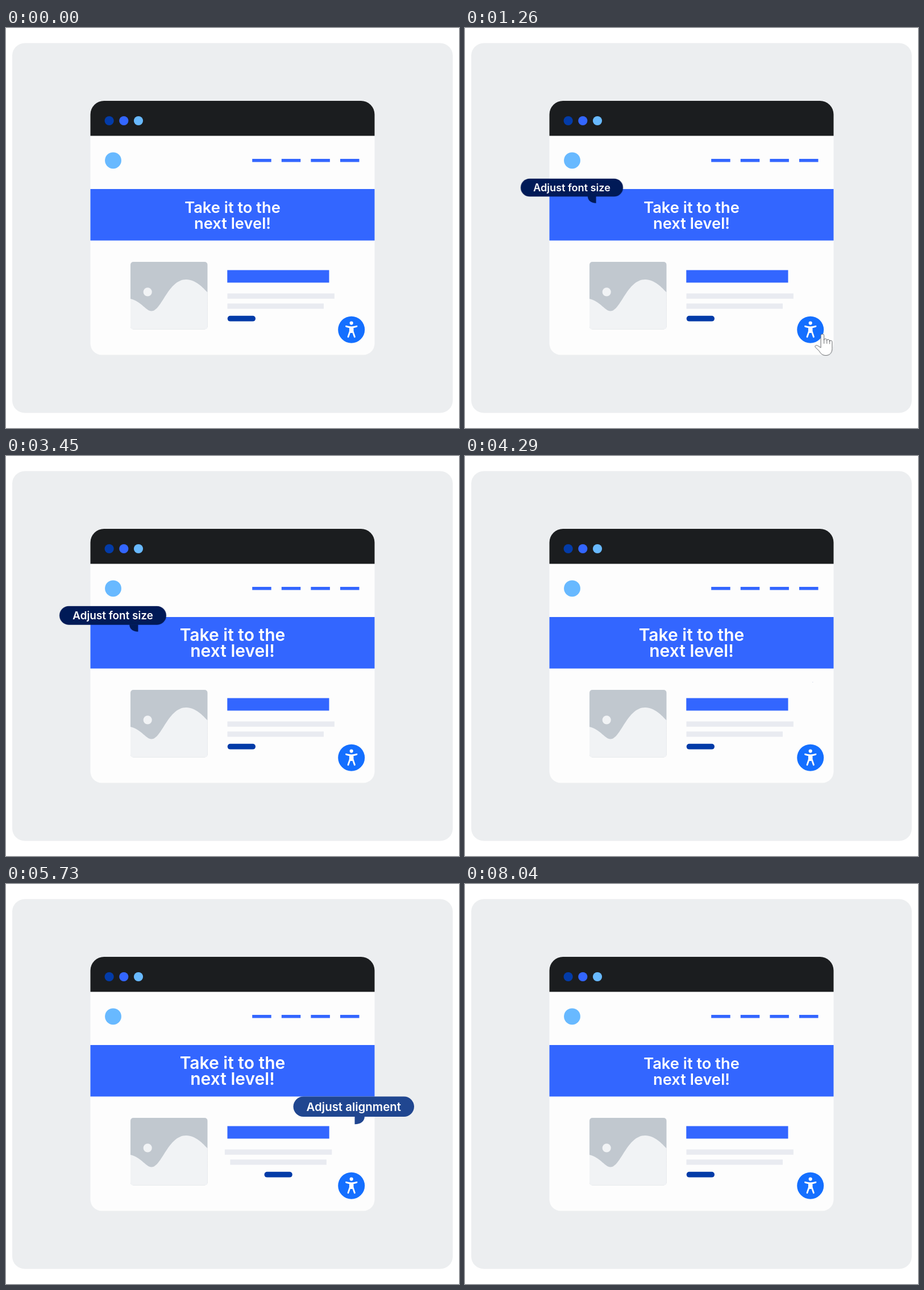
An HTML page with a canvas for the animation above (9 s loop, 797 by 703 pixels).

```html
<!DOCTYPE html>
<html lang="en">
<head>
<meta charset="utf-8">
<title>Accessibility adjustments</title>
<style>
  html, body { margin: 0; width: 100%; height: 100%; overflow: hidden; background: #fff; }
  canvas { display: block; }
</style>
</head>
<body>
<canvas id="stage" width="797" height="703"></canvas>
<script>
const LOOP = 9000, STEP = 30;
const SHUTTER = 16, SAMPLES = 8; // motion blur: ms and sub-frames
const BLUE = '#3366ff', NAVY = '#033ba8', SKY = '#68b9ff', LINE = '#e9ebf1';

const screen = document.getElementById('stage');
const output = screen.getContext('2d');
const layer = document.createElement('canvas');
layer.width = screen.width;
layer.height = screen.height;
const ctx = layer.getContext('2d');

// Timing helpers
const bezier = (a, b, c, d, u) =>
  (1 - u) ** 3 * a + 3 * (1 - u) ** 2 * u * b + 3 * (1 - u) * u * u * c + u ** 3 * d;

const ease = (x1, x2) => p => {
  let low = 0, high = 1;
  for (let i = 0; i < 20; i++) {
    const mid = (low + high) / 2;
    if (bezier(0, x1, x2, 1, mid) < p) low = mid; else high = mid;
  }
  return bezier(0, 0, 1, 1, low);
};
const growEase = ease(.33, .22);
const shrinkEase = ease(.8, .73);
const shiftEase = ease(.4, .3);

const progress = (t, start, end) => Math.min(1, Math.max(0, (t - start) / (end - start)));
const mix = (a, b, p) => a + (b - a) * p;
const toggle = (t, start, end) =>
  shiftEase(progress(t, start, end)) - shiftEase(progress(t, 7770, 8040));

// Drawing helpers
function box(color, left, top, right, bottom, radius = 0) {
  ctx.fillStyle = color;
  ctx.beginPath();
  ctx.roundRect(left, top, right - left, bottom - top, radius);
  ctx.fill();
}
function dot(color, x, y, r) {
  ctx.fillStyle = color;
  ctx.beginPath();
  ctx.arc(x, y, r, 0, 2 * Math.PI);
  ctx.fill();
}
function label(text, x, y, size) {
  ctx.font = `600 ${size}px Inter, "Open Sans", sans-serif`;
  ctx.textAlign = 'center';
  ctx.fillStyle = '#fff';
  ctx.fillText(text, x, y);
}
function fillPath(color, path) {
  ctx.fillStyle = color;
  ctx.fill(path);
}

const hill = new Path2D('M219 476C239 481 246 497.5 256 497.5C274 497.5 285 442 317 442C334 442 347 457 354.5 464.5V524.5Q354.5 529.5 349.5 529.5H224Q219 529.5 219 524.5Z');
const figure = new Path2D('M598.5 524.3Q607.7 527.3 617 524.3M605.3 526V533L602 542.8M610.1 526V533L613.4 542.8M605.5 533.5L607.7 532L609.9 533.5');
const torso = new Path2D('M604.5 525H610.9V533L609.5 536H606L604.5 533Z');
const hand = new Path2D('M10.8 24V3.2a2.8 2.8 0 0 1 5.6 0V11c0-3 5-3 5 0v1c0-3 4.8-2.8 4.8 .5v1c0-2.5 4.5-2.5 4.5 .8V26c0 7-4 12-11 12-6 0-9-3-12-8L1 23.5C0 21 2 19.5 4.5 20.5Z');
const knuckles = new Path2D('M16.4 10V17M21.4 11V17M26.2 12V17.5');

const tooltips = [
  { text: 'Adjust font size', color: '#001a57', left: 86.5, right: 289.5, top: 262,
    tail: new Path2D('M219.5 297C219.5 305 226 310.5 236 310.5V297Z'),
    enter: [780, 1560], leave: [3210, 3930] },
  { text: 'Adjust alignment', color: '#204690', left: 505.5, right: 718, top: 373.5,
    tail: new Path2D('M631 408C631 417 624 422.3 613.5 422.3V408Z'),
    enter: [4260, 5040], leave: [6870, 7470] },
];

function drawTooltip(tip, t) {
  const scale = growEase(progress(t, ...tip.enter)) - shrinkEase(progress(t, ...tip.leave));
  if (scale < .001) return;
  const x = (tip.left + tip.right) / 2, y = tip.top + 24.4;
  ctx.save();
  ctx.translate(x, y);
  ctx.scale(scale, scale);
  ctx.translate(-x, -y);
  fillPath(tip.color, tip.tail);
  box(tip.color, tip.left, tip.top, tip.right, tip.top + 35.5, 17.75);
  label(tip.text, x, tip.top + 25.2, 20.4);
  ctx.restore();
}

function drawCursor(t) {
  const away = t < 900 ? (1 - progress(t, 30, 600)) ** 2 : progress(t, 1050, 2010) ** 2;
  if (away === 1) return;
  ctx.save();
  ctx.translate(bezier(604, 684, 727, 727, away), bezier(537, 537, 600, 710, away));
  fillPath('#fff', hand);
  ctx.strokeStyle = '#55585c';
  ctx.lineWidth = .9;
  ctx.lineCap = ctx.lineJoin = 'round';
  ctx.stroke(hand);
  ctx.stroke(knuckles);
  ctx.restore();
}

function drawWindow() {
  box('#fff', 0, 0, 797, 703);
  box('#eceef0', 11, 26.5, 786, 676.5, 22);
  box('#fdfdfd', 148.5, 128, 648.5, 574.5, [24, 24, 20, 20]);
  box('#1b1d1f', 148.5, 128, 648.5, 189.5, [24, 24, 0, 0]);
  [NAVY, BLUE, SKY].forEach((color, i) => dot(color, 181.6 + 25.7 * i, 163, 8.1));
  dot(SKY, 188.5, 232.8, 14.4);
  for (let i = 0; i < 4; i++) box(BLUE, 433.2 + 51.6 * i, 230, 466.7 + 51.6 * i, 235.4);
  box(BLUE, 148.5, 283, 648.5, 373.5);
}

function drawContent(t) {
  const size = 27.3 * mix(1, 1.1, toggle(t, 1890, 2250));
  label('Take it to the', 398.5, 325, size);
  label('next level!', 398.5, 353, size);

  box('#c1c8cf', 219, 411, 354.5, 529.5, 5);
  fillPath('#f1f3f5', hill);
  dot('#f1f3f5', 249.2, 463.8, 7.6);

  const centered = toggle(t, 5370, 5730);
  const bar = (color, from, to, width, top, bottom, radius) => {
    const left = mix(from, to, centered);
    box(color, left, top, left + width, bottom, radius);
  };
  bar(BLUE, 389.3, 389.5, 179.2, 425.4, 447.6);
  bar(LINE, 389.5, 384.9, 188.4, 466.5, 475.8);
  bar(LINE, 389.5, 394.4, 169.5, 484.2, 493.4);
  bar(NAVY, 389.7, 454.5, 49.3, 505.8, 515.6, 4.9);
}

function drawAccessButton() {
  dot('#146fff', 607.7, 530.2, 23.5);
  dot('#fff', 607.7, 518.6, 3.1);
  fillPath('#fff', torso);
  ctx.strokeStyle = '#fff';
  ctx.lineWidth = 2.8;
  ctx.lineCap = ctx.lineJoin = 'round';
  ctx.stroke(figure);
}

function drawScene(t) {
  drawWindow();
  drawContent(t);
  drawAccessButton();
  tooltips.forEach(tip => drawTooltip(tip, t));
  drawCursor(t);
}

let shown = -1;
function play(now) {
  const t = Math.floor(now % LOOP / STEP) * STEP;
  if (t !== shown) {
    shown = t;
    for (let i = 0; i < SAMPLES; i++) {
      drawScene(t + SHUTTER * ((i + .5) / SAMPLES - .5));
      output.globalAlpha = 1 / (i + 1);
      output.drawImage(layer, 0, 0);
    }
  }
  requestAnimationFrame(play);
}
requestAnimationFrame(play);
</script>
</body>
</html>
```
